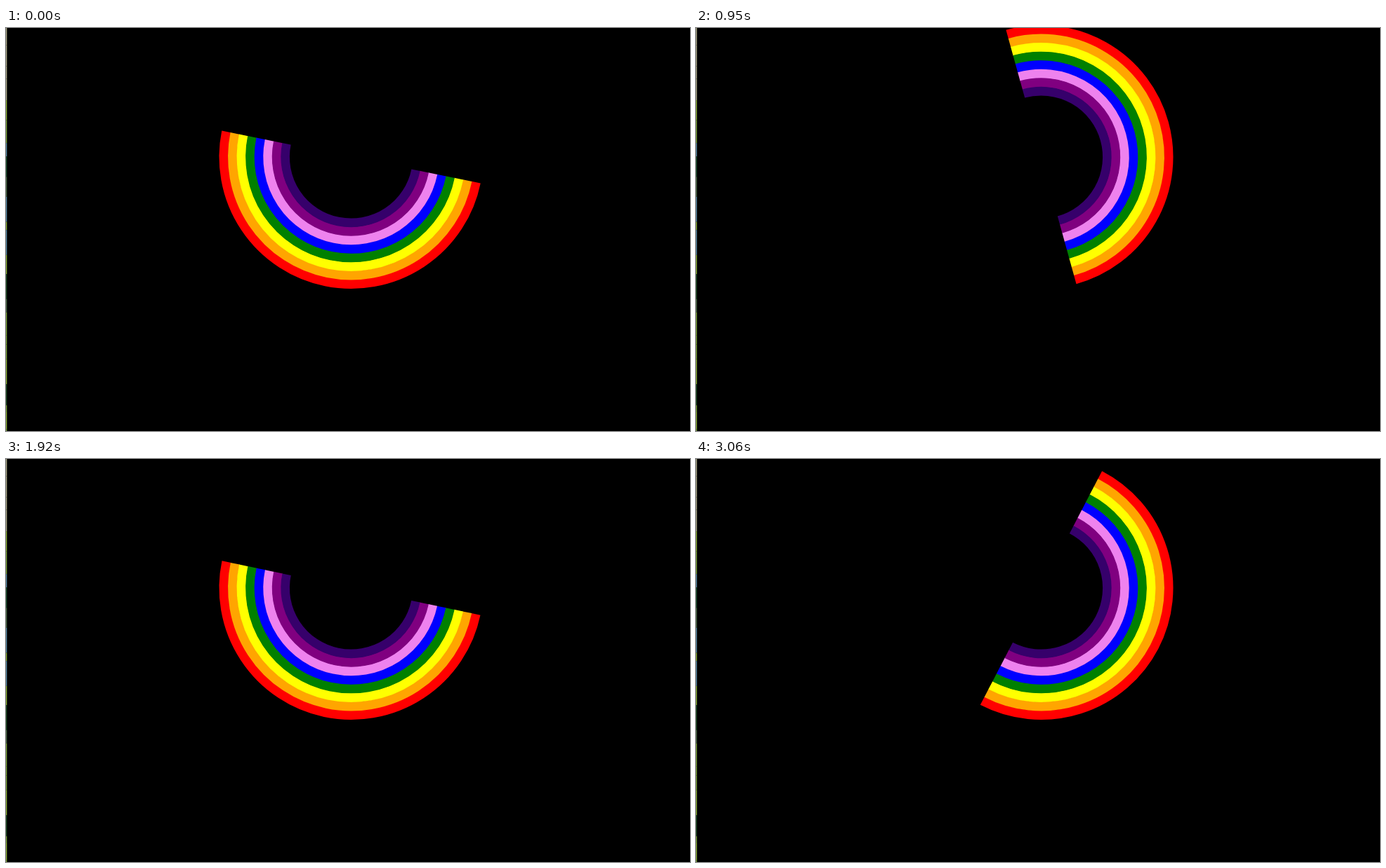
Animation of 974x575 px, one loop 3160 ms. Source, as an HTML page with a canvas:

```html
<!DOCTYPE html>
<html lang="en">
<head>
<meta charset="utf-8">
<title>Spinning rainbow</title>
<style>
  html, body { margin: 0; width: 100%; height: 100%; overflow: hidden; background: #000; }
  canvas { display: block; }
</style>
</head>
<body>
<canvas id="stage" width="974" height="575"></canvas>
<script>
const ctx = document.getElementById('stage').getContext('2d');
const LOOP = 3160;
const TURN = 1906;
const LAST_STEP = 22;
const RADIUS = 188;
const BAND = 12.55;
const COLORS = ['red', 'orange', 'yellow', 'green', 'blue', 'violet', 'purple', '#36006b'];
const SCENERY = ['#1c5030', '#7ca43c', '#4c6a48', '#8cb038', '#5a8ca8', '#1c4a24'];

// Poses are held for four or five ticks of 30 ms.
const stepStart = step => Math.max(0, 30 * Math.floor(4.565 * step + 0.88) - 10);

function heldTime(time) {
  let step = LAST_STEP;
  while (stepStart(step) > time) step--;
  return stepStart(step);
}

// Cubic ease-in-out with handles at .42 and .58
function easeInOut(x) {
  let low = 0, high = 1;
  for (let i = 0; i < 24; i++) {
    const u = (low + high) / 2, v = 1 - u;
    if (1.26 * u * v * v + 1.74 * u * u * v + u ** 3 < x) low = u;
    else high = u;
  }
  return low * low * (3 - 2 * low);
}

// Sliver of scenery at the left border: pale at the top, then mixed greens
function drawSliver() {
  let seed = 7;
  const random = () => (seed = seed * 16807 % 2147483647) / 2147483647;
  for (let y = 0; y < 575;) {
    const height = 8 + 30 * random();
    const color = SCENERY[Math.floor(random() * SCENERY.length)];
    ctx.fillStyle = y < 100 ? '#aaa888' : color;
    ctx.fillRect(0, y, 1.3, height);
    y += height;
  }
}

function drawRainbow(angle) {
  ctx.save();
  ctx.translate(491.5, 184);
  ctx.rotate(angle);
  COLORS.forEach((color, i) => {
    // A slight overlap hides the seams between bands.
    const width = BAND + (i < COLORS.length - 1 ? 0.6 : 0);
    ctx.strokeStyle = color;
    ctx.lineWidth = width;
    ctx.beginPath();
    ctx.arc(0, 0, RADIUS - i * BAND - width / 2, Math.PI, 2 * Math.PI);
    ctx.stroke();
  });
  ctx.restore();
}

function draw() {
  const time = heldTime(performance.now() % LOOP);
  const phase = (0.1265 + time / TURN) % 1;
  ctx.clearRect(0, 0, 974, 575);
  drawSliver();
  drawRainbow(Math.PI * (1 + 2 * easeInOut(phase)));
  requestAnimationFrame(draw);
}
draw();
</script>
</body>
</html>
```
